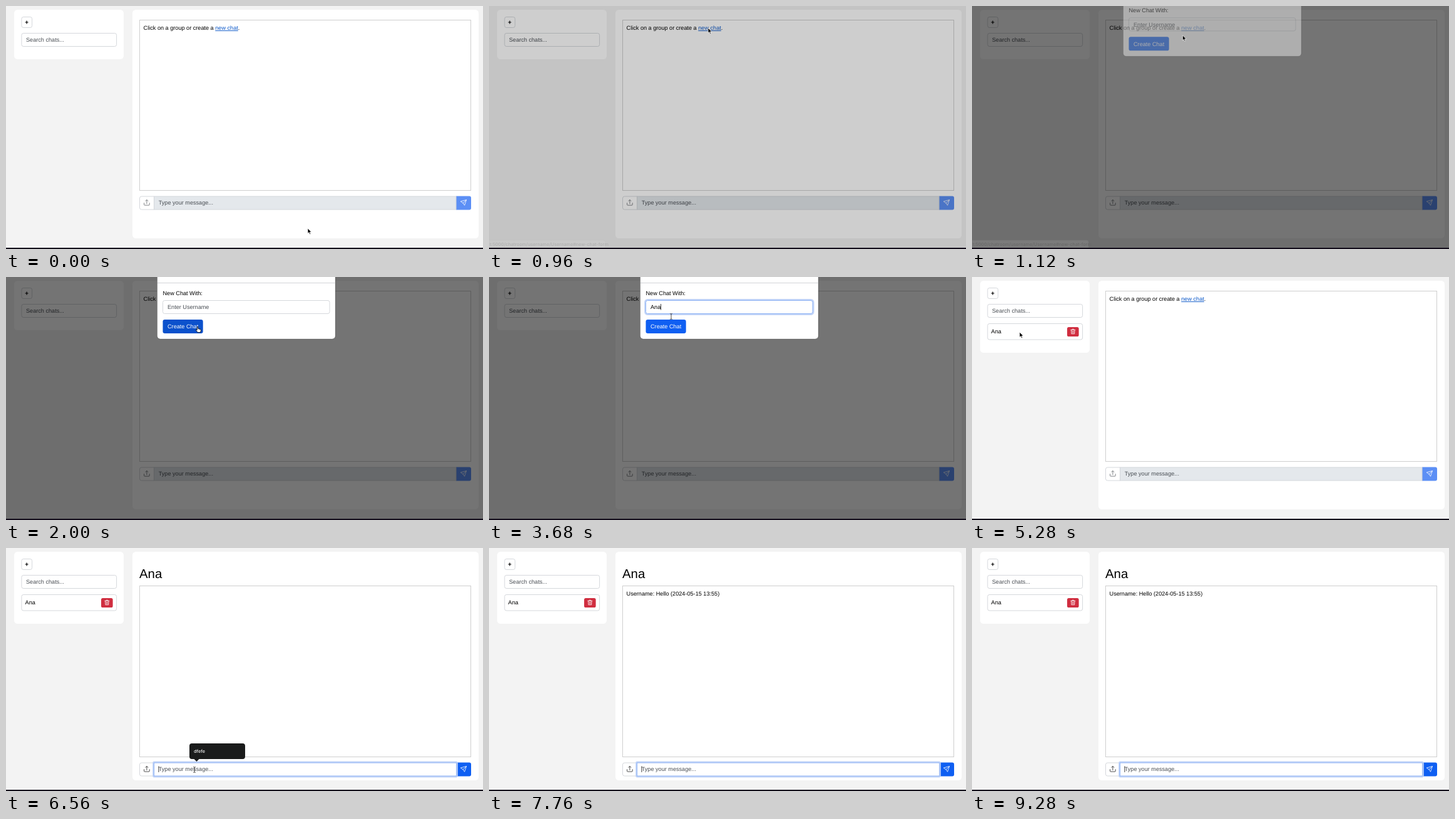
Write an HTML page that moves like this. It is 762 px wide and 388 px high and loops after 9.76 s.

```html
<!DOCTYPE html>
<html lang="en">
<head>
<meta charset="utf-8">
<title>Chat demo</title>
<style>
html, body { margin: 0; width: 100%; height: 100%; overflow: hidden; background: #f3f3f3; }
svg { display: block; width: 762px; height: 388px; }
text { font: 9.14px "Liberation Sans", Arial, Helvetica, sans-serif; fill: #000; text-rendering: geometricPrecision; white-space: pre; }
.hint { fill: #4a4f55; }
.box { fill: #fff; stroke: #d5d8dc; }
.icon { fill: none; stroke-width: .8; stroke-linecap: round; stroke-linejoin: round; }
.ring { fill: none; stroke: #c3d5f8; stroke-width: 2.6; }
.focus { fill: #fff; stroke: #8db2f5; stroke-width: 1; }
.small { font: 500 7.2px Inter, Roboto, sans-serif; }
</style>
</head>
<body>
<svg viewBox="0 0 762 388" xmlns="http://www.w3.org/2000/svg">
  <rect width="762" height="388" fill="#f3f3f3"/>

  <g id="sidebar">
    <rect id="side" x="13" y="6" width="175" height="79" rx="5.5" fill="#fff"/>
    <rect class="box" x="24.9" y="17.5" width="16.7" height="17" rx="3"/>
    <path d="M30.6 26h5M33.1 23.5v5" stroke="#000" stroke-width="1.2"/>
    <rect class="box" x="24.9" y="43.5" width="151.7" height="21" rx="3"/>
    <text class="hint" x="32" y="57">Search chats...</text>
    <g id="item">
      <rect id="itemBox" class="box" x="24.9" y="74.5" width="151.7" height="25.5" rx="3"/>
      <text x="30.6" y="90.2">Ana</text>
      <rect x="152" y="80" width="18.6" height="15" rx="2.6" fill="#d02e40"/>
      <path class="icon" stroke="#fff" d="M157.8 84.4h7M160 84.2v-.9h2.6v.9M158.5 84.6l.4 6.1h4.8l.4-6.1M160.4 86.2v3M162.2 86.2v3"/>
    </g>
  </g>

  <rect x="202" y="6" width="553" height="365" rx="5.5" fill="#fff"/>
  <text id="title" x="213" y="47.8" style="font-size:20.4px">Ana</text>
  <rect id="log" x="213.5" y="22.5" width="529" height="272" fill="#fff" stroke="#cfcfcf"/>
  <g id="intro">
    <text x="219.6" y="38">Click on a group or create a <tspan fill="#0d59c9" text-decoration="underline">new chat</tspan>.</text>
  </g>
  <text id="message" x="219.6" y="76">Username: Hello (2024-05-15 13:55)</text>

  <g id="bar">
    <path class="box" d="M236.5 304H216.5q-3 0-3 3v15q0 3 3 3h20z"/>
    <path id="upload" class="icon" d="M220.6 314.6v2.6q0 .9.9.9h6.8q.9 0 .9-.9v-2.6M224.9 315.6v-6M222.9 311.4l2-2 2 2"/>
    <path id="send" d="M719 303.5h21q3 0 3 3v16q0 3-3 3h-21z"/>
    <path class="icon" stroke="#fff" d="M735.4 309.8l-2.9 8.5-2.4-3.6-3.6-2.4zM735.4 309.8l-5.3 4.9"/>
    <rect id="entry" x="236.5" y="304" width="482.5" height="21"/>
    <rect id="entryRing" class="ring" x="235.4" y="302.8" width="485" height="23.4" rx="1.5"/>
    <rect id="entryFocus" class="focus" x="236.5" y="304" width="483" height="21"/>
    <text id="entryText" x="243.7" y="317.4"></text>
    <rect id="entryCaret" y="309.4" width=".8" height="9.6" fill="#111"/>
  </g>

  <g id="suggest">
    <path d="M297 312h81q4 0 4 4v17q0 4-4 4h-69.500l-4 4-4-4h-3.500q-4 0-4-4v-17q0-4 4-4z" fill="#1a1b1b"/>
    <text class="small" x="300" y="327" style="fill:#f4f4f4">dfefe</text>
  </g>

  <rect id="shade" width="762" height="388" fill="#000"/>

  <g id="modal">
    <rect x="241.500" y="-40" width="284.600" height="139" rx="5" fill="#fff" stroke="#000" stroke-opacity=".3" stroke-width=".8"/>
    <path d="M242 9.500H526" stroke="#d2d4d8"/>
    <text x="250.500" y="28.800">New Chat With:</text>
    <rect id="nameRing" class="ring" x="249.400" y="36.300" width="268.800" height="23.400" rx="4"/>
    <rect id="nameBox" x="250.500" y="37.500" width="266.500" height="21" rx="3"/>
    <text id="nameText" x="258" y="51.200"></text>
    <rect id="nameCaret" y="43" width=".8" height="9.600" fill="#111"/>
    <rect id="create" x="250.500" y="68" width="64.200" height="22" rx="3.200"/>
    <text x="258" y="82.200" style="fill:#fff">Create Chat</text>
  </g>

  <g id="bubble">
    <rect x="330.500" y="59.500" width="105" height="24" rx="2.500" fill="#000" opacity=".18"/>
    <rect x="330.500" y="58.500" width="104" height="24" rx="2.500" fill="#fff" stroke="#ccc" stroke-width=".6"/>
    <rect x="335" y="64.500" width="12.500" height="12.500" rx="1.500" fill="#f39a1e"/>
    <path d="M341.200 67v4.800M341.200 73.600v1.200" stroke="#fff" stroke-width="1.400"/>
    <text class="small" x="352" y="73.300">Please fill in this field.</text>
  </g>

  <g id="status">
    <path d="M0 374h183q3 0 3 3v9H0z" fill="#e4e4e4" stroke="#aaa" stroke-width=".6"/>
    <text class="small" x="1" y="383" style="fill:#444">t:5000/chatroom/username/Username#new-chat-form</text>
  </g>

  <rect y="386" width="762" height="2" fill="#120c1a"/>

  <g id="cursor">
    <path id="arrow" d="M0 0v8.200l1.900-1.700 1.300 3 1.400-.6-1.300-2.900h2.600z" fill="#000" stroke="#fff" stroke-width=".7"/>
    <path id="hand" d="M-.8.8Q0-.4.8.8V3.600L5 4.700Q5.600 5 5.400 6L4.600 9.500H.3L-2.900 5.600Q-2.700 4.500-1.700 5.200L-.8 6z" fill="#fff" stroke="#000" stroke-width=".8" stroke-linejoin="round"/>
    <path id="beam" d="M-1.800-4.500Q0-4.500 0-3.500Q0-4.500 1.800-4.500M0-3.500V3.500M-1.800 4.500Q0 4.500 0 3.500Q0 4.500 1.800 4.500" fill="none" stroke="#222" stroke-width=".8"/>
  </g>
</svg>
<script>
const LOOP = 9760, STEP = 80;
const el = {};
document.querySelectorAll('[id]').forEach(n => el[n.id] = n);

const path = [
  [0, 482, 355], [80, 452, 285], [160, 390, 130], [240, 343, 40],
  [320, 343, 40], [400, 330, 36], [480, 312, 34], [640, 345, 36],
  [720, 370, 36], [800, 350, 35], [960, 350, 35], [1040, 346, 39],
  [1440, 298, 78], [1920, 298, 78], [2000, 306, 79], [2080, 304, 78],
  [2400, 304, 78], [2640, 298, 48], [3520, 298, 48], [3840, 284, 78],
  [4160, 282, 87], [4560, 282, 87], [5280, 76, 88], [5680, 76, 88],
  [6400, 301, 354]
];
const kinds = [
  [0, 'arrow'], [240, 'hand'], [400, 'arrow'], [640, 'hand'], [880, 'arrow'],
  [1360, 'hand'], [2560, 'beam'], [2960, ''], [3600, 'beam'], [3760, 'hand'],
  [4400, 'arrow'], [6400, 'beam'], [6800, '']
];
const nameKeys = [2960, 3120, 3280];
const wordKeys = [6800, 6960, 7040, 7200, 7360];

const clamp = v => Math.max(0, Math.min(1, v));
const ramp = (t, start, length) => clamp((t - start) / length);
const easeOut = p => 1 - Math.pow(1 - p, 1.8);
const within = (t, a, b) => t >= a && t < b;
const show = (node, on) => node.setAttribute('visibility', on ? 'visible' : 'hidden');
const set = (node, attrs) => { for (const k in attrs) node.setAttribute(k, attrs[k]); };

function cursorAt(t) {
  const i = path.findIndex(k => k[0] > t);
  if (i < 0) return path[path.length - 1].slice(1);
  const [a, b] = [path[i - 1], path[i]], p = ramp(t, a[0], b[0] - a[0]);
  return [a[1] + (b[1] - a[1]) * p, a[2] + (b[2] - a[2]) * p];
}

const typed = (word, keys, t) => word.slice(0, keys.filter(k => t >= k).length);

function fill(id, value, hint, caretOn) {
  const node = el[id + 'Text'], caret = el[id + 'Caret'];
  const label = value || hint;
  if (node.textContent !== label) node.textContent = label;
  node.setAttribute('class', value ? '' : 'hint');
  const x = +node.getAttribute('x') + (value ? node.getComputedTextLength() : -.2);
  caret.setAttribute('x', x);
  show(caret, caretOn);
}

function drawModal(t) {
  const opened = ramp(t, 1057, 150), closed = ramp(t, 4130, 150);
  const slide = easeOut(ramp(t, 1057, 300)) - easeOut(ramp(t, 4130, 300));
  const focus = t >= 2640;
  set(el.modal, {
    opacity: opened - closed,
    transform: `translate(0 ${-28.5 * (1 - slide)})`
  });
  set(el.shade, { opacity: .545 * (ramp(t, 907, 150) - ramp(t, 3980, 150)) });
  show(el.nameRing, focus);
  set(el.nameBox, { class: focus ? 'focus' : 'box' });
  fill('name', t < 4080 ? typed('Ana', nameKeys, t) : '', 'Enter Username', focus);
  const hover = within(t, 1360, 2480) || t >= 3760;
  set(el.create, { fill: hover ? '#0b51cc' : '#0f5ff2' });
  set(el.bubble, { opacity: .22 * ramp(t, 4080, 80) + .5 * ramp(t, 4160, 120) - .72 * ramp(t, 4320, 200) });
  set(el.status, { opacity: .15 * ramp(t, 900, 60) * (1 - ramp(t, 1040, 300)) });
}

function drawChat(t) {
  const chat = t >= 5680, focus = t >= 6480, listed = t >= 4080;
  show(el.item, listed);
  set(el.side, { height: listed ? 115 : 79 });
  const tint = within(t, 5440, 5520) ? '#f5f6f7' : within(t, 5520, 5680) ? '#e9ebee' : '#fff';
  el.itemBox.style.fill = tint;
  show(el.title, chat);
  show(el.intro, !chat);
  show(el.message, t >= 7760);
  set(el.log, { y: chat ? 60.5 : 22.5, height: chat ? 273 : 272 });
  set(el.bar, { transform: `translate(0 ${chat ? 39 : 0})` });
  set(el.upload, { stroke: chat ? '#222' : '#62666a' });
  set(el.send, { fill: chat ? '#0f5ff2' : '#5c8ff5' });
  set(el.entry, { fill: chat ? '#fff' : '#e4e8ec', stroke: chat ? '#d5d8dc' : '#d3d7db' });
  show(el.entryRing, focus);
  show(el.entryFocus, focus);
  const blink = within(t, 7840, 8320) || within(t, 8800, 9280);
  fill('entry', t < 7760 ? typed('Hello', wordKeys, t) : '', 'Type your message...', focus && !blink);
  show(el.suggest, within(t, 6560, 6800));
}

function drawCursor(t) {
  const kind = kinds.filter(k => t >= k[0]).pop()[1];
  set(el.cursor, { transform: `translate(${cursorAt(t).join(' ')})` });
  for (const k of ['arrow', 'hand', 'beam']) show(el[k], k === kind);
}

function draw(now) {
  const t = Math.floor(now % LOOP / STEP) * STEP;
  drawChat(t);
  drawModal(t);
  drawCursor(t);
}

let start;
function tick(now) {
  if (start === undefined) start = now;
  draw(Math.max(0, now - start));
  requestAnimationFrame(tick);
}
draw(0);
requestAnimationFrame(tick);
</script>
</body>
</html>
```
